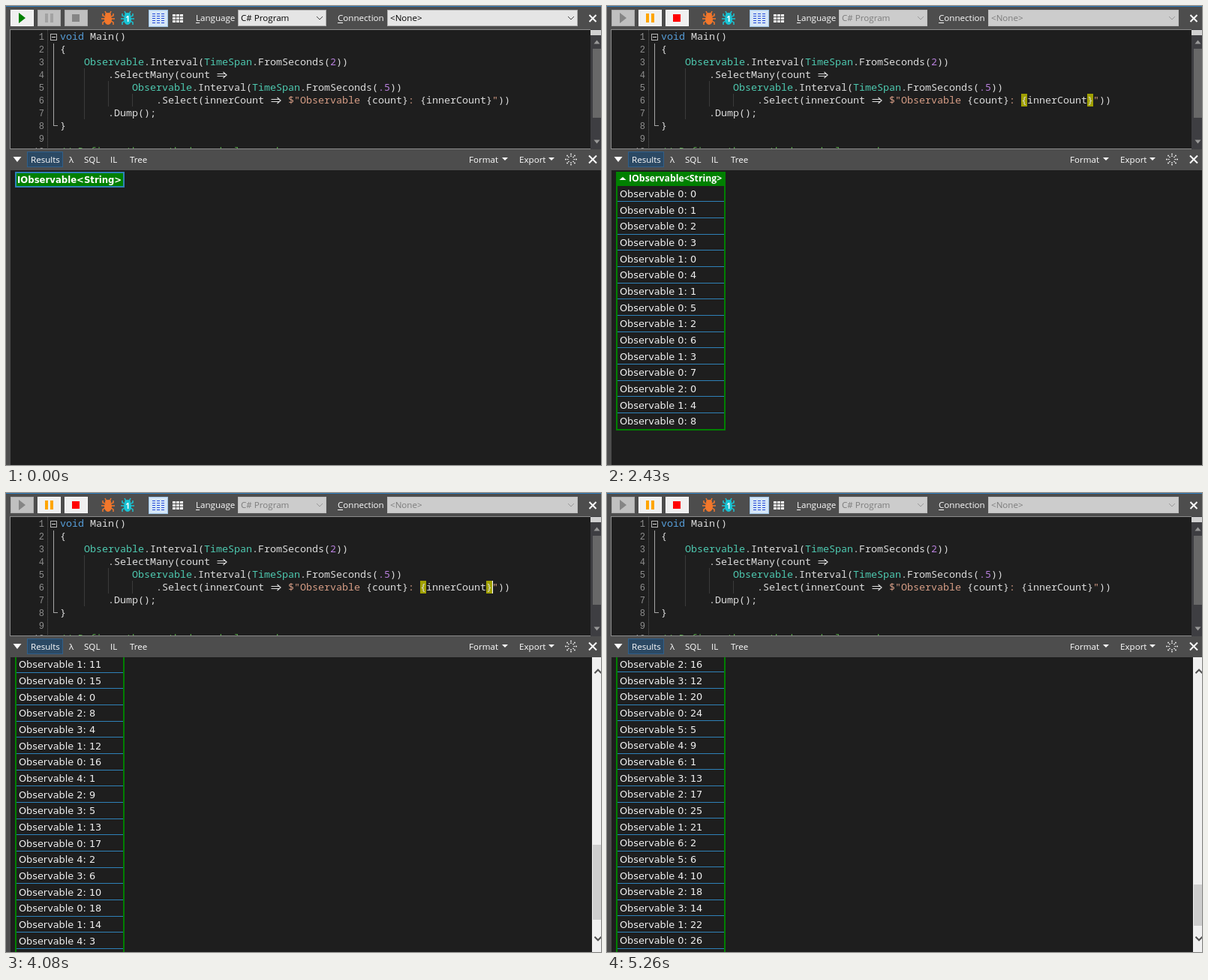
An HTML page with a canvas for the animation above (5.28 s loop, 793 px wide and 612 px high).

```html
<!DOCTYPE html>
<html lang="en">
<head>
<meta charset="utf-8">
<title>Nested intervals</title>
<style>
html, body { margin: 0; width: 100%; height: 100%; overflow: hidden; background: #1e1e1e; }
canvas { display: block; }
</style>
</head>
<body>
<canvas id="stage" width="793" height="612"></canvas>
<script>
const ctx = document.getElementById('stage').getContext('2d');

const LOOP = 5280;
const RUN_AT = 20, READY_AT = 425, BLUR_AT = 5250;
const TICK_AT = 1207, TICK = 150, ROW_DELAY = 10;
const SCROLL_STEP = 35, SCROLL_PHASE = 2;
const BLINK_AT = 601, BLINK = 158;
const PITCH = 65 / 3, TABLE_TOP = 241, PANEL_TOP = 219;

const UI = '11.6px "Open Sans", sans-serif';
const MONO = '13.333px "Noto Sans Mono", monospace';
const GUTTER = '12px "Liberation Mono", monospace';
const CELL = '12.85px "DejaVu Sans", sans-serif';

const BAR = '#4d4d4d', DARK = '#1e1e1e', GREEN = '#008000', BLUE = '#2f81b7';
const PLAIN = '#dcdcdc', KEY = '#569cd6', TYPE = '#4ec9b0', NUM = '#b77fdb', STR = '#d69d85';

// Ticks in which the inner sequences arrive out of descending order.
const ORDER = { 16: '42310', 17: '42310', 18: '43201', 24: '6542310', 25: '5463201', 26: '6542310' };

const rows = [];
for (let i = 0; TICK_AT + i * TICK < LOOP; i++) {
  const last = Math.floor(i / 4);
  const order = ORDER[i] ? [...ORDER[i]].map(Number) : Array.from({ length: last + 1 }, (_, k) => last - k);
  order.forEach((c, k) => rows.push({
    at: TICK_AT + i * TICK + k * ROW_DELAY,
    text: `Observable ${c}: ${i - 4 * c}`
  }));
}
const countAt = t => rows.filter(r => r.at <= t).length;

function box(x, y, w, h, color) {
  ctx.fillStyle = color;
  ctx.fillRect(x, y, w, h);
}
function frame(x, y, w, h, color, line = 1) {
  ctx.strokeStyle = color;
  ctx.lineWidth = line;
  ctx.strokeRect(x + line / 2, y + line / 2, w - line, h - line);
}
function text(s, x, y, font, color, align = 'left') {
  ctx.font = font;
  ctx.fillStyle = color;
  ctx.textAlign = align;
  ctx.fillText(s, x, y);
}
function poly(points, color) {
  ctx.fillStyle = color;
  ctx.beginPath();
  points.forEach(([x, y]) => ctx.lineTo(x, y));
  ctx.fill();
}
function line(points, color, width = 1) {
  ctx.strokeStyle = color;
  ctx.lineWidth = width;
  ctx.beginPath();
  points.forEach(([x, y], i) => i ? ctx.lineTo(x, y) : ctx.moveTo(x, y));
  ctx.stroke();
}
function clip(x, y, w, h, draw) {
  ctx.save();
  ctx.beginPath();
  ctx.rect(x, y, w, h);
  ctx.clip();
  draw();
  ctx.restore();
}
// Solid triangle pointing down (dir 1) or up (dir -1).
const arrow = (x, y, r, h, color, dir = 1) =>
  poly([[x - r, y - dir * h / 2], [x + r, y - dir * h / 2], [x, y + dir * h / 2]], color);
const chevron = (x, y, r, color, dir = 1, width = 1) =>
  line([[x - r, y - dir * r / 2], [x, y + dir * r / 2], [x + r, y - dir * r / 2]], color, width);
function cross(x, y, r) {
  line([[x - r, y - r], [x + r, y + r]], '#fff', 2);
  line([[x + r, y - r], [x - r, y + r]], '#fff', 2);
}

function bug(x, y, color) {
  for (const s of [-1, 1]) {
    line([[x + s * 4, y - 2], [x + s * 7, y - 3], [x + s * 7, y - 6]], color, 1.5);
    line([[x + s * 4, y + 1], [x + s * 9, y + 1]], color, 1.5);
    line([[x + s * 4, y + 4], [x + s * 7, y + 6], [x + s * 7, y + 9]], color, 1.5);
    line([[x + s * 2, y - 5], [x + s * 4, y - 9]], color, 1.5);
  }
  ctx.fillStyle = color;
  ctx.beginPath();
  ctx.ellipse(x, y + 2, 5, 7, 0, 0, 7);
  ctx.ellipse(x, y - 4, 4, 3, 0, 0, 7);
  ctx.fill();
}

function button(x, enabled) {
  box(x, 5, 31, 22, enabled ? '#f0f0f0' : '#c0c0c0');
  frame(x, 5, 31, 22, enabled ? '#fff' : '#adadad');
}
function combo(x, w, label, running) {
  box(x, 5, w, 22, running ? '#cccccc' : '#e5e5e5');
  frame(x, 5, w, 22, running ? '#bfbfbf' : '#adadad');
  text(label, x + 4, 20, UI, running ? '#7b7b7b' : '#000');
  chevron(x + w - 9, 16, 4, running ? '#999' : '#444');
}
function label(s, x, w) {
  text(s, x, 20, UI, '#fff');
  box(x, 22, w, 1, '#fff');
}

function toolbar(running) {
  box(0, 0, 793, 31, BAR);
  box(0, 0, 793, 1, '#2d7dbd');
  button(6, !running);
  poly([[17, 9], [26, 16], [17, 23]], running ? '#858585' : GREEN);
  button(42, running);
  for (const x of [52, 59]) box(x, 10, 4, 12, running ? '#ffa500' : '#a2a2a2');
  button(78, running);
  box(88, 11, 10, 10, running ? '#f00' : '#858585');

  bug(136, 16, '#f3772b');
  bug(162, 16, '#19c3d4');
  text('1', 162, 21, 'bold 10px "Open Sans", sans-serif', '#fff', 'center');

  box(190, 5, 26, 23, '#d5e6f7');
  frame(190, 5, 26, 23, '#9cc3e6');
  for (let r = 0; r < 5; r++)
    for (let c = 0; c < 3; c++) box(195 + c * 6, 10 + r * 3, 4, 1, '#2448d8');
  for (let r = 0; r < 3; r++)
    for (let c = 0; c < 3; c++) box(222 + c * 5, 11 + r * 4, 4, 3, '#fff');

  label('Language', 253, 5);
  combo(309, 118, 'C# Program', running);
  label('Connection', 442, 7);
  combo(508, 254, '<None>', running);
  cross(782, 16.5, 4.5);
}

const CODE = [
  [0, ['void', KEY], [' Main()']],
  [0, ['{']],
  [4, ['Observable', TYPE], ['.Interval('], ['TimeSpan', TYPE], ['.FromSeconds('], ['2', NUM], ['))']],
  [8, ['.SelectMany(count '], ['=>']],
  [12, ['Observable', TYPE], ['.Interval('], ['TimeSpan', TYPE], ['.FromSeconds('], ['.5', NUM], ['))']],
  [16, ['.Select(innerCount '], ['=>'], [' '], ['$"Observable ', STR], ['{count}'], [': ', STR],
    ['{innerCount}'], ['"', STR], ['))']],
  [8, ['.Dump();']],
  [0, ['}']],
  [0],
  [0, ['// Define other methods and classes here', '#57a64a']]
];

// The "=>" ligature, two cells wide.
function fatArrow(x, y) {
  line([[x + 1.5, y - 1.5], [x + 12, y - 1.5]], PLAIN);
  line([[x + 1.5, y + 1.5], [x + 12, y + 1.5]], PLAIN);
  line([[x + 9.5, y - 4], [x + 14, y], [x + 9.5, y + 4]], PLAIN, 1.2);
}

function editor(focused, caret) {
  box(0, 31, 793, 160, BAR);
  box(5, 31, 776, 160, DARK);
  frame(5, 31, 776, 160, '#8c8c8c');
  clip(6, 32, 773, 158, () => {
    for (let y = 32; y < 190; y += 2) box(55, y, 1, 1, '#5c5c5c');
    box(104, 83, 1, 68, '#3a3a3a');
    box(136, 100, 1, 34, '#3a3a3a');
    box(168, 117, 1, 17, '#3a3a3a');
    frame(59, 37, 9, 9, '#b4b4b4');
    box(61, 41, 5, 1, '#e0e0e0');
    box(63, 50, 1, 110, '#a5a5a5');
    box(63, 159, 6, 1, '#a5a5a5');
    if (focused) for (const x of [552, 640]) box(x, 117, 8, 17, '#a0a000');
    CODE.forEach(([indent, ...parts], i) => {
      const y = 45 + i * 17;
      text(i + 1, 51, y, GUTTER, '#8e8e8e', 'right');
      let x = 72 + indent * 8;
      for (const [s, color = PLAIN] of parts) {
        if (s === '=>') fatArrow(x, y - 4);
        else text(s, x, y, MONO, color);
        x += s.length * 8;
      }
    });
    if (caret) box(648, 117, 1, 17, '#fff');
  });

  box(779, 31, 14, 160, '#3e3e42');
  box(779, 32, 14, 7, '#d0d0d0');
  arrow(787.5, 48, 4, 5, '#999', -1);
  box(782, 57, 11, 92, '#686868');
  arrow(787.5, 181, 4, 5, '#999');
}

function resultsBar() {
  box(0, 191, 793, 28, BAR);
  arrow(15, 204.5, 5.5, 7, '#fff');
  box(28, 194, 48, 21, '#2b4964');
  frame(28, 194, 48, 21, '#2f5f8a');
  for (const [s, x] of [['Results', 33], ['λ', 84], ['SQL', 104], ['IL', 139], ['Tree', 165],
    ['Format', 617], ['Export', 684]]) text(s, x, 209, UI, '#fff');
  arrow(665, 204, 4, 4, '#fff');
  arrow(727, 204, 4, 4, '#fff');
  for (let k = 0; k < 8; k++) {
    const a = k * Math.PI / 4, c = Math.cos(a), s = Math.sin(a);
    line([[753 + c * 3.5, 204.5 + s * 3.5], [753 + c * 5.2, 204.5 + s * 5.2]], '#fff', 1.2);
    box(752.2 + c * 7, 203.7 + s * 7, 1.6, 1.6, '#fff');
  }
  cross(782, 204.5, 5);
}

function emptyHeader() {
  box(12, 221, 146, 21, GREEN);
  frame(12, 221, 146, 21, BLUE, 2);
  text('IObservable<String>', 15, 236, 'bold 11.7px "DejaVu Sans", sans-serif', '#fff');
}

function table(count, scroll) {
  const bottom = Math.round(TABLE_TOP + PITCH * count - scroll);
  box(12, 221 - scroll, 146, 19, GREEN);
  arrow(21, 230 - scroll, 4.5, 4, '#fff', -1);
  text('IObservable<String>', 29, 234 - scroll, 'bold 12.3px "Open Sans", sans-serif', '#fff');
  box(12, 240 - scroll, 2, bottom - 240 + scroll, GREEN);
  box(156, 240 - scroll, 2, bottom - 240 + scroll, GREEN);
  for (let i = 0; i < count; i++) {
    const y = PITCH * i - scroll;
    if (y < -60 || y > 400) continue;
    text(rows[i].text, 17, Math.round(255 + y), CELL, '#f0f0f0');
    if (i < count - 1) box(14, Math.round(260.4 + y), 142, 1, BLUE);
  }
  box(12, bottom - 2, 146, 2, GREEN);
}

function scrollbar(count, scroll) {
  const content = TABLE_TOP + PITCH * count - PANEL_TOP + 3;
  const scale = 327 / content;
  box(781, PANEL_TOP, 12, 393, '#f0f0f0');
  box(782, Math.round(253 + scroll * scale), 11, Math.round(393 * scale), '#cdcdcd');
  chevron(789, 238, 4.5, '#505050', -1, 2);
  chevron(789, 594, 4.5, '#505050', 1, 2);
}

function results(t) {
  box(0, 219, 793, 393, BAR);
  box(6, PANEL_TOP, 787, 393, DARK);
  const count = countAt(t);
  if (!count) {
    if (t < RUN_AT || t >= READY_AT) emptyHeader();
    return;
  }
  const settled = Math.floor((t - SCROLL_PHASE) / SCROLL_STEP) * SCROLL_STEP + SCROLL_PHASE;
  const end = TABLE_TOP + PITCH * countAt(settled);
  const scroll = end > 612 ? Math.round(end - 609) : 0;
  clip(6, PANEL_TOP, 787, 393, () => table(count, scroll));
  if (scroll) scrollbar(count, scroll);
}

function draw(t) {
  const running = t >= RUN_AT;
  const focused = running && t < BLUR_AT;
  const caret = focused && t >= BLINK_AT && Math.floor((t - BLINK_AT) / BLINK) % 2 === 0;
  toolbar(running);
  editor(focused, caret);
  resultsBar();
  results(t);
}

const start = performance.now();
function tick() {
  draw((performance.now() - start) % LOOP);
  requestAnimationFrame(tick);
}
tick();
</script>
</body>
</html>
```
